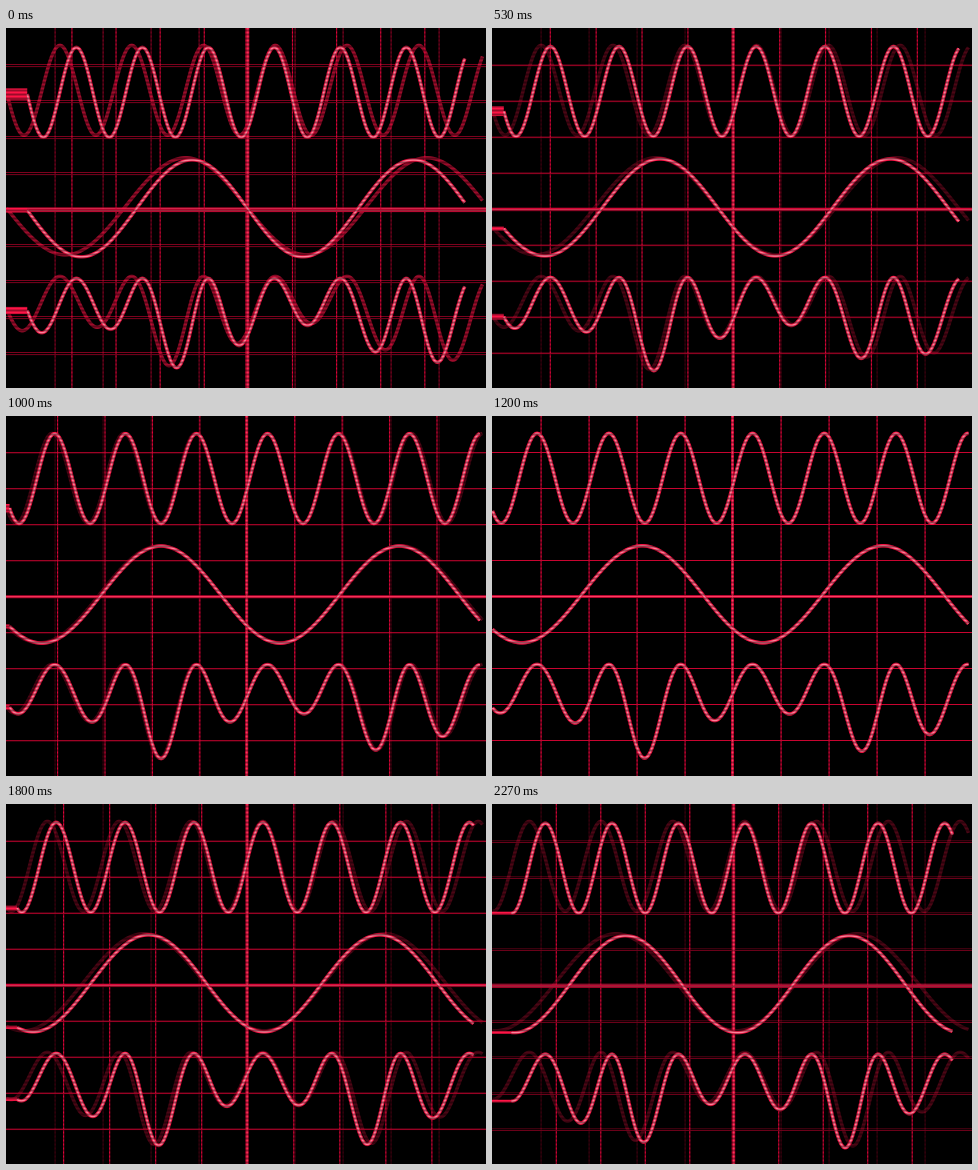
Write a matplotlib script that moves like this. It is 480 px wide and 360 px high and loops after 2340 ms.

```python
import numpy as np
import matplotlib.pyplot as plt
from matplotlib.animation import FuncAnimation
from matplotlib.collections import LineCollection

W, H = 480, 360
LOOP, STEP = 2340, 10      # ms
DPI = 80
PX = 72 / DPI              # one pixel in points
WAVE_END = 476
WAVE_WIDTH = 3.5
xs = np.linspace(0, WAVE_END, 320)

fig = plt.figure(figsize=(W / DPI, H / DPI), dpi=DPI, facecolor="black")
ax = fig.add_axes([0, 0, 1, 1])
ax.axis("off")


def waves(t):
    """Carrier, modulator and the carrier divided by the modulator."""
    phase = 0.744 - 0.103 * t - 0.011 * np.sin(2 * np.pi * t / 2.34)
    carrier = np.cos(2 * np.pi * (xs / 71.8 - phase))
    slow = np.cos(2 * np.pi * (xs / 241 - phase))
    return (61.8 - 45 * carrier,
            177.8 - 48.5 * slow,
            247.8 + 94 * (1 - carrier) / (3 - slow))


class Scope:
    """Grid, axes and three traces, squeezed sideways by a left margin."""

    def __init__(self, z):
        self.parts = []

        def lines(width, color):
            c = LineCollection([], linewidths=width * PX, colors=color,
                               zorder=z + len(self.parts), snap=False)
            self.parts.append(ax.add_collection(c))
            return c

        self.columns = lines(1.2, "#dc0438")
        self.rows = lines(1, "#c80430")
        self.axes = lines(3, "#e00438")
        self.axes_core = lines(1.2, "#ff3c60")
        self.body = lines(WAVE_WIDTH, "#ff1446")
        self.smear = lines(WAVE_WIDTH, "#ff1446")
        self.core = lines(1.6, "#ff8098")

    def update(self, curves, margin, alpha):
        scale, dy = 1 - 0.0039 * margin, 0.1 * margin

        def column(x):
            return [(margin + x * scale, -2), (margin + x * scale, H + 2)]

        def row(y):
            return [(-2, y + dy), (W + 2, y + dy)]

        self.columns.set_segments([column(48 * n + 0.6) for n in range(1, 10) if n != 5])
        self.rows.set_segments([row(36 * n) for n in range(1, 10) if n != 5])
        for part in (self.axes, self.axes_core):
            part.set_segments([column(240), row(180)])

        traces = [np.column_stack([margin + xs * scale, y + dy]) for y in curves]
        for part in (self.body, self.core):
            part.set_segments(traces)

        # The leftmost pixel column is stretched across the margin.
        self.smear.set_segments([[(-2, c[0] + dy), (margin, c[0] + dy)]
                                 for c in curves if margin > 0.5])
        slopes = [(c[1] - c[0]) / (xs[1] - xs[0]) for c in curves]
        self.smear.set_linewidths([0.8 * WAVE_WIDTH * PX * np.hypot(1, k) for k in slopes])
        for part in self.parts:
            part.set_alpha(alpha)


ghost, scope = Scope(1), Scope(10)
ghost.core.set_visible(False)

scan = np.zeros((H, 1, 4))
scan[:, 0, 3] = 0.2 * (1 - np.cos(np.pi * np.arange(H) / 2))
ax.imshow(scan, extent=(-0.5, W - 0.5, H - 0.5, -0.5), aspect="auto",
          interpolation="nearest", zorder=30)
ax.set_xlim(-0.5, W - 0.5)
ax.set_ylim(H - 0.5, -0.5)


def draw(i):
    # The picture advances 15 times a second; the first one is held twice as long.
    tick = min(int((i * STEP + 4.9) * 15 / 1000), 34)
    if tick == 1:
        tick = 0
    t = tick / 15
    margin = max(0, 17.7 * abs(t - 1.19) - 0.3)
    curves = waves(t)
    ghost.update(curves, 0, 0.62 if tick == 0 else 0.3)
    scope.update(curves, margin, 1)
    return ghost.parts + scope.parts


anim = FuncAnimation(fig, draw, frames=LOOP // STEP, interval=STEP,
                     init_func=lambda: draw(0), repeat=True, repeat_delay=0)
plt.show()
```
